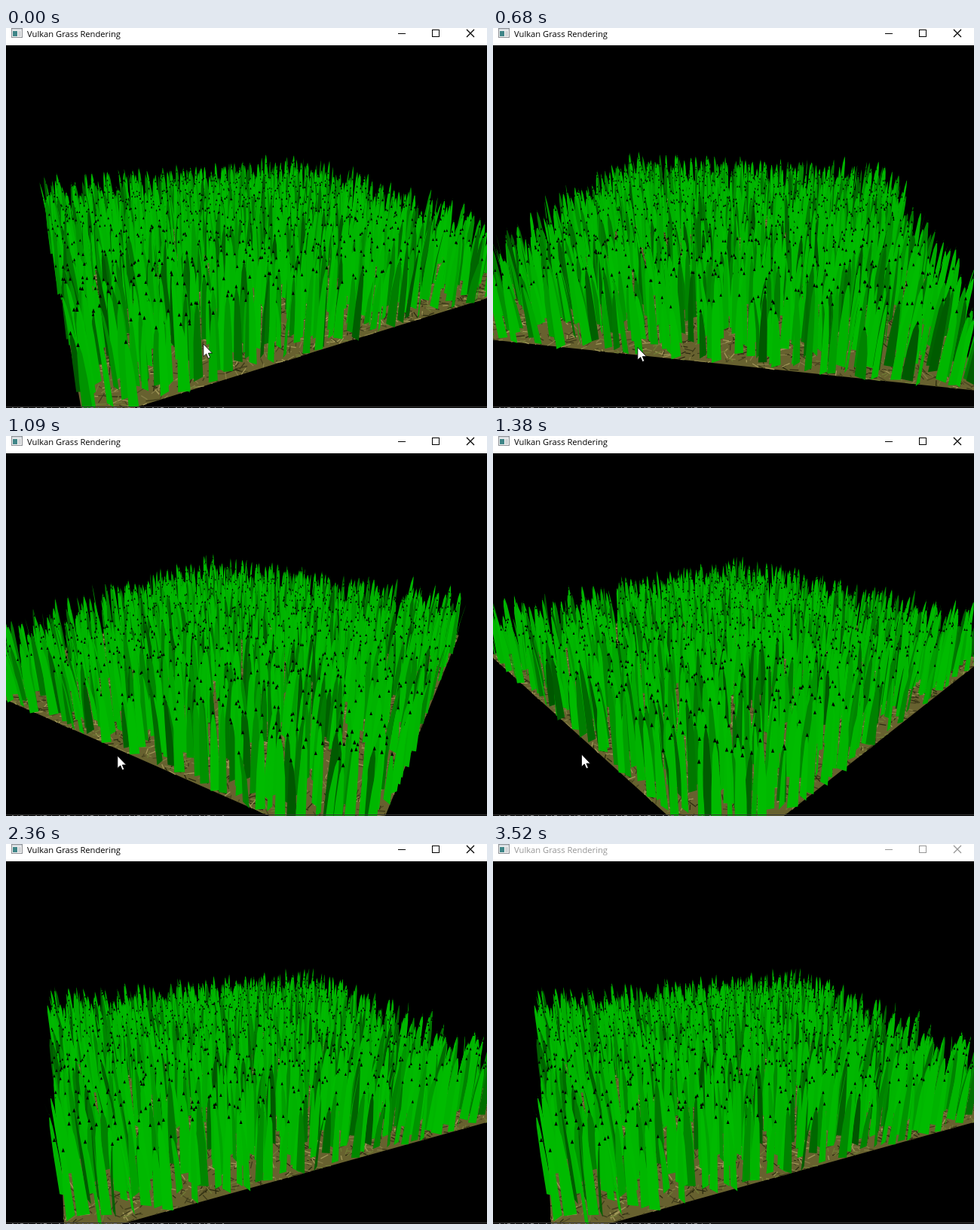
An HTML page with a canvas for the animation above (3.54 s loop, 638 by 505 pixels).

```html
<!DOCTYPE html>
<html lang="en">
<head>
<meta charset="utf-8">
<title>Vulkan Grass Rendering</title>
<style>
html, body { margin: 0; width: 638px; height: 505px; overflow: hidden; background: #000; }
canvas, svg { position: absolute; left: 0; top: 0; display: block; }
text { font: 11.2px "Open Sans", "Noto Sans", sans-serif; }
</style>
</head>
<body>
<canvas id="scene" width="638" height="505"></canvas>
<svg width="638" height="505" viewBox="0 0 638 505">
  <rect width="638" height="23" fill="#fff"/>
  <g shape-rendering="crispEdges">
    <rect x="7" y="0" width="15" height="13" fill="#8b8f94"/>
    <rect x="8" y="1" width="13" height="2" fill="#d5d9de"/>
    <rect x="8" y="3" width="13" height="9" fill="#f3f3f3"/>
    <rect x="9" y="4" width="6" height="7" fill="#3f8587"/>
    <rect x="16" y="4" width="4" height="7" fill="#d2d5d8"/>
  </g>
  <text id="label" x="28" y="12">Vulkan Grass Rendering</text>
  <g id="buttons" fill="none" stroke="#000">
    <path d="M520 7.5h10M565.5 2.5h9v9h-9z" shape-rendering="crispEdges"/>
    <path d="M611 2l10 10M621 2l-10 10" stroke-width="1.3"/>
  </g>
  <rect y="503" width="638" height="1" fill="#3a3a3a"/>
  <path d="M8 504.5H292" stroke="#777" stroke-dasharray="2 5 1 3 4 6 1 9"/>
  <path id="cursor" d="M0 0V16.5L3.8 13L6.4 19L8.9 17.9L6.4 12.1H11.6Z" fill="#fff" stroke="#000" stroke-width=".8"/>
</svg>
<script>
const LOOP = 3540, CX = 319, CY = 263, FOCAL = 579.4, RADIUS = 18.8, HALF = 7.5;
const ctx = document.getElementById('scene').getContext('2d');
const label = document.getElementById('label');
const buttons = document.getElementById('buttons');
const cursor = document.getElementById('cursor');

let seed = 20177;
function rand() {
  seed = (seed + 0x6D2B79F5) | 0;
  let t = Math.imul(seed ^ (seed >>> 15), 1 | seed);
  t = (t + Math.imul(t ^ (t >>> 7), 61 | t)) ^ t;
  return ((t ^ (t >>> 14)) >>> 0) / 4294967296;
}
const range = (a, b) => a + (b - a) * rand();
const clamp = (v, a, b) => Math.max(a, Math.min(b, v));

// One blade somewhere in each cell of a square grid
const CELLS = 46;
const inCell = n => (n + rand()) / CELLS * 2 * HALF - HALF;
const blades = Array.from({ length: CELLS * CELLS }, (_, i) => {
  const angle = range(0, Math.PI * 2), lean = range(0, 0.2);
  const green = rand() < 0.55 ? range(178, 188) : range(85, 178);
  return {
    x: inCell(i % CELLS), z: inCell(Math.floor(i / CELLS)),
    h: range(1.5, 2.65), w: range(0.1, 0.145),
    wx: Math.cos(angle), wz: Math.sin(angle),
    lx: -Math.sin(angle) * lean, lz: Math.cos(angle) * lean,
    color: `rgb(0,${Math.round(green)},0)`
  };
});

const STRAW = ['#2c2b10', '#4a4620', '#837b45', '#a09658', '#6f7a35', '#3d3a1a'];
const straws = STRAW.map(color => ({
  color,
  lines: Array.from({ length: 1100 }, () => {
    const x = range(-HALF, HALF), z = range(-HALF, HALF);
    const a = range(0, Math.PI * 2), l = range(0.1, 0.35);
    return [x, z, clamp(x + Math.cos(a) * l, -HALF, HALF), clamp(z + Math.sin(a) * l, -HALF, HALF)];
  })
}));

// Drag path of the mouse: time, x, y
const DRAG = [[0, 262, 420], [280, 228, 424], [680, 192, 424.5], [1090, 148, 425], [1690, 90, 421], [2140, 76, 422]];

function slope(i, k) {
  const last = DRAG.length - 1;
  if (i === last) return 0;
  const a = DRAG[Math.max(0, i - 1)], b = DRAG[i + 1];
  return (b[k] - a[k]) / (b[0] - a[0]);
}

function dragAt(t, k) {
  const last = DRAG[DRAG.length - 1];
  if (t >= last[0]) return last[k];
  let i = 0;
  while (t >= DRAG[i + 1][0]) i++;
  const a = DRAG[i], b = DRAG[i + 1], d = b[0] - a[0], u = (t - a[0]) / d;
  const u2 = u * u, u3 = u2 * u;
  return (2 * u3 - 3 * u2 + 1) * a[k] + (u3 - 2 * u2 + u) * d * slope(i, k)
    + (3 * u2 - 2 * u3) * b[k] + (u3 - u2) * d * slope(i + 1, k);
}

let cosYaw, sinYaw, cosPitch, sinPitch;
function setCamera(yaw, pitch) {
  const r = Math.PI / 180;
  cosYaw = Math.cos(yaw * r); sinYaw = Math.sin(yaw * r);
  cosPitch = Math.cos(pitch * r); sinPitch = Math.sin(pitch * r);
}

function project(x, y, z) {
  const vx = x * cosYaw + z * sinYaw, vz = z * cosYaw - x * sinYaw;
  const k = FOCAL / (RADIUS - vz * cosPitch - y * sinPitch);
  return [CX + vx * k, CY - (y * cosPitch - vz * sinPitch - 1) * k, k];
}

function fillPoly(points, color) {
  ctx.fillStyle = color;
  ctx.beginPath();
  points.forEach(p => ctx.lineTo(p[0], p[1]));
  ctx.fill();
}

function drawGround() {
  fillPoly([[-1, -1], [1, -1], [1, 1], [-1, 1]].map(c => project(c[0] * HALF, 0, c[1] * HALF)), '#67612f');
  ctx.lineWidth = 1.3;
  for (const { color, lines } of straws) {
    ctx.strokeStyle = color;
    ctx.beginPath();
    for (const [x0, z0, x1, z1] of lines) {
      const a = project(x0, 0, z0), b = project(x1, 0, z1);
      ctx.moveTo(a[0], a[1]);
      ctx.lineTo(b[0], b[1]);
    }
    ctx.stroke();
  }
}

function drawBlade(b) {
  const side = (t, s) => {
    const w = b.w * s * (1 - 0.4 * t), bend = t * t;
    return project(b.x + b.lx * bend + b.wx * w, b.h * t, b.z + b.lz * bend + b.wz * w);
  };
  const tip = project(b.x + b.lx, b.h, b.z + b.lz), [x, y, k] = tip;
  fillPoly([side(0, -1), side(0.5, -1), side(0.85, -0.7), tip, side(0.85, 0.7), side(0.5, 1), side(0, 1)], b.color);
  fillPoly([[x, y], [x + 0.034 * k, y + 0.09 * k], [x - 0.034 * k, y + 0.09 * k]], '#000');
}

function drawScene(yaw, pitch) {
  setCamera(yaw, pitch);
  ctx.fillStyle = '#000';
  ctx.fillRect(0, 0, 638, 505);
  drawGround();
  // Blades seen edge-on are dropped; the rest go from back to front
  blades.filter(b => Math.abs(b.wx * cosYaw + b.wz * sinYaw) > 0.42)
    .map(b => ({ b, depth: b.z * cosYaw - b.x * sinYaw }))
    .sort((p, q) => p.depth - q.depth)
    .forEach(o => drawBlade(o.b));
}

let drawnAt = -1;
function render(t) {
  const x = dragAt(t, 1), y = dragAt(t, 2), still = Math.min(t, 2140);
  if (still !== drawnAt) {
    drawScene(26 - (262 - x) / 2, 18.7 + 0.55 * (y - 420));
    drawnAt = still;
  }
  const exit = clamp((t - 2150) / 200, 0, 1);
  cursor.setAttribute('transform', `translate(${x + 14 * exit} ${y + 90 * exit * exit})`);
  cursor.style.display = exit < 1 ? '' : 'none';
  const g = Math.round(150 * clamp((t - 3300) / 200, 0, 1)), ink = `rgb(${g},${g},${g})`;
  label.setAttribute('fill', ink);
  buttons.setAttribute('stroke', ink);
}

const start = performance.now();
function tick() {
  render((performance.now() - start) % LOOP);
  requestAnimationFrame(tick);
}
tick();
</script>
</body>
</html>
```
